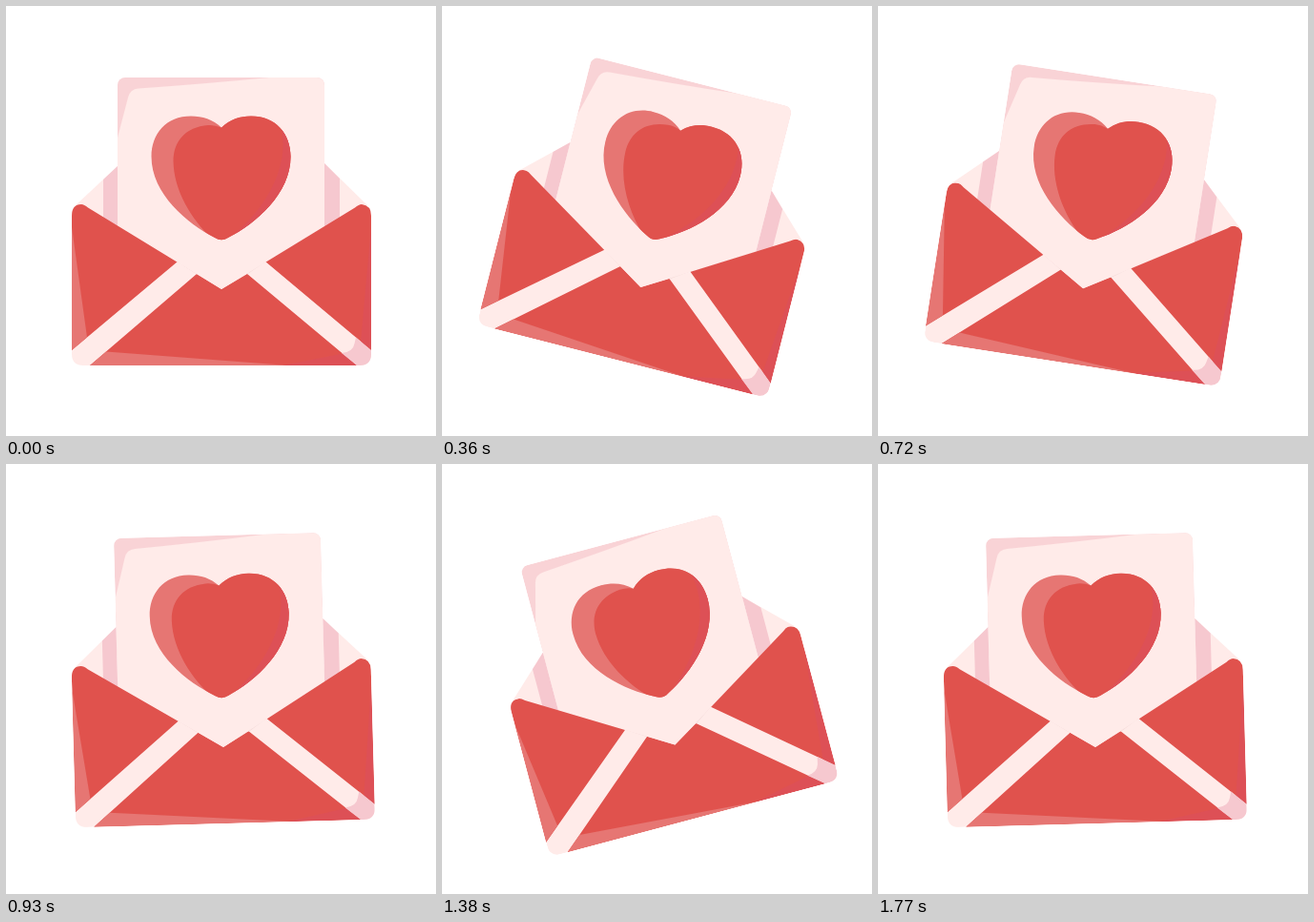
Write an HTML page that moves like this. It is 451 by 451 pixels and loops after 1.8 s.

```html
<!DOCTYPE html>
<html lang="en">
<head>
<meta charset="utf-8">
<title>Love letter</title>
<style>
  html, body { margin: 0; width: 100%; height: 100%; overflow: hidden; background: #fff; }
  svg { display: block; width: 100%; height: 100%; }
  .paper { fill: #ffebe9; }
  .blush { fill: #f9d3d6; }
  .rose { fill: #f6c8cf; }
  .red { fill: #e0524d; }
  .tint { fill: #e67673; }
  .shade { fill: #dd5056; }
</style>
</head>
<body>
<svg viewBox="0 0 451 451">
  <defs>
    <clipPath id="body">
      <path d="M69 220Q69 208 79 208Q82 208 86 211.500L226 297L366 211.500Q370 208 373 208Q383 209 383 220V365Q383 377 371 377H81Q69 377 69 365Z"/>
    </clipPath>
    <clipPath id="card"><rect x="117" y="75" width="217" height="240" rx="8"/></clipPath>
    <clipPath id="heart">
      <path d="M226 127.500C235 119 245 115.500 257 115.500C283 115.500 298.500 134 298.500 158C298.500 197 262 228 233 243Q226 247.500 219 243C190 228 152.500 197 152.500 158C152.500 134 168 115.500 194 115.500C206 115.500 217 119 226 127.500Z"/>
    </clipPath>
  </defs>
  <g id="letter">
    <!-- envelope back -->
    <path class="paper" d="M73 209L117 168V231H86ZM379 209L334 165V231H366Z"/>
    <path class="rose" d="M102 182L117 168V231H102ZM350 181L334 165V231H350Z"/>

    <!-- card -->
    <g clip-path="url(#card)">
      <path class="blush" d="M117 75H334V231L226 297L117 231Z"/>
      <path class="paper" d="M117 138L128 96Q130 87 139 86.500Q205 82 276 75H334V231L226 297L117 231Z"/>
    </g>
    <g clip-path="url(#heart)">
      <path class="tint" d="M150 110H300V250H150Z"/>
      <path class="red" d="M226 127.500Q219 124.500 212 125C188 127 175.500 142 175.500 163C176 194 195 224 215 243L226 250H300V110H226Z"/>
      <path class="shade" d="M287 122C300 163 276 210 235 243L300 250V120Z"/>
    </g>

    <!-- envelope front -->
    <g clip-path="url(#body)">
      <path class="paper" d="M69 361L180 268L226 297L272 268L383 361V377H69Z"/>
      <path class="red" d="M60 200H86L180 268L69 361H60ZM392 200H366L272 268L383 361H392ZM88 377L200 281L226 297L253 281L368 377Z"/>
      <path class="tint" d="M69 232L85 347.500L69 361ZM88 377L105 362.500L296 377Z"/>
      <path class="shade" d="M383 232L372 352L383 361ZM353 364.500L368 377H290Z"/>
      <path class="rose" d="M367 347.500L383 361V377H368L352 364Q364 363 365.500 354Z"/>
      <path d="M180 268L200 281M272 268L253 281" stroke="#f5dcda" fill="none"/>
    </g>
  </g>
</svg>
<script>
  const LOOP = 1800, STEP = 30, SWING = 15;
  const letter = document.getElementById('letter');

  function draw() {
    const time = Math.floor((performance.now() + 1) / STEP) * STEP % LOOP;
    const angle = SWING * Math.sin(2 * Math.PI * time / LOOP);
    letter.setAttribute('transform', `rotate(${angle} 225.5 225.5)`);
    requestAnimationFrame(draw);
  }
  draw();
</script>
</body>
</html>
```
